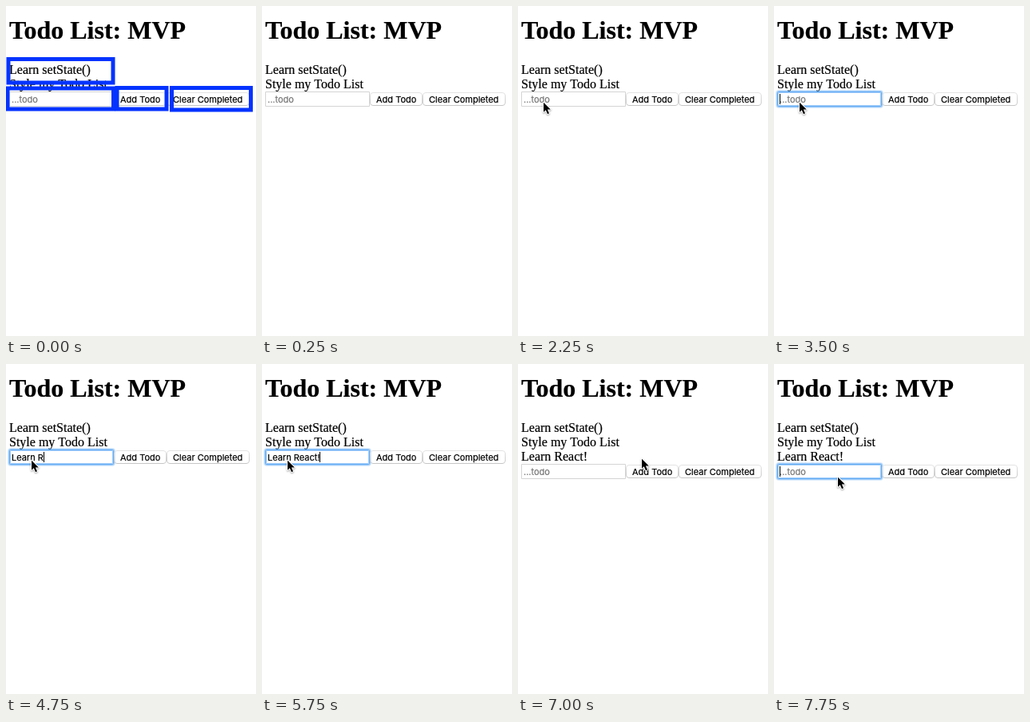
Recreate the animation shown at these times as an HTML page with a canvas. Size 313 px wide and 413 px high, loop 8000 ms.

```html
<!DOCTYPE html>
<html lang="en">
<head>
<meta charset="utf-8">
<title>Todo List</title>
<style>
  html, body { margin: 0; width: 100%; height: 100%; overflow: hidden; background: #fff; }
  canvas { display: block; width: 313px; height: 413px; }
</style>
</head>
<body>
<canvas id="stage"></canvas>
<script>
const W = 313, H = 413, LOOP = 8000, STEP = 250;
const SERIF = '"Liberation Serif", "Times New Roman", serif';
const UI = '11px Inter, Roboto, sans-serif';

const canvas = document.getElementById('stage');
const ctx = canvas.getContext('2d');
const dpr = window.devicePixelRatio || 1;
canvas.width = W * dpr;
canvas.height = H * dpr;

const entry = 'Learn React!';
const todos = ['Learn setState()', 'Style my Todo List'];
const TYPE_START = 4000, TYPE_END = 6000, PRESS = 6750, ADDED = 7000;
const FOCUS = 2500, REFOCUS = 7750;

// Places the pointer settles at; each move takes MOVE ms.
const MOVE = 500;
const stops = [
  { t: 500, x: 21, y: 147 },
  { t: 1000, x: 55, y: 118 },
  { t: 2250, x: 31, y: 120 },
  { t: 6500, x: 151, y: 118 },
  { t: 7000, x: 154, y: 118 },
  { t: 7500, x: 79, y: 141 }
];
const arrowShape = new Path2D('M1 .8V12.8L3.8 10.2 6 15.2 8 14.3 5.9 9.5H9.8Z');

const clamp = v => Math.min(1, Math.max(0, v));
const easeOut = (p, power) => 1 - (1 - clamp(p)) ** power;

function pointerAt(t) {
  const pos = { ...stops[0] };
  for (const stop of stops) {
    const p = easeOut((t - stop.t + MOVE) / MOVE, 2.2);
    pos.x += (stop.x - pos.x) * p;
    pos.y += (stop.y - pos.y) * p;
  }
  return pos;
}

function typedAt(t) {
  if (t < TYPE_START || t >= ADDED) return '';
  const p = (t - TYPE_START + STEP / 2) / (TYPE_END - TYPE_START);
  return entry.slice(0, Math.round(entry.length * easeOut(p, 1.7)));
}

const focusedAt = t => (t >= FOCUS && t < PRESS) || t >= REFOCUS;

// The caret blinks, starting over after focus and after the last key.
function caretAt(t) {
  if (!focusedAt(t)) return false;
  if (t >= TYPE_START && t < TYPE_END) return true;
  const since = t - (t >= REFOCUS ? REFOCUS : t >= TYPE_END ? TYPE_END : FOCUS);
  return Math.floor(since / 500) % 2 === 0;
}

// A hairline stroke gives the slightly heavier look of smoothed type.
function text(str, x, y, font, color = '#000') {
  ctx.font = font;
  ctx.fillStyle = ctx.strokeStyle = color;
  ctx.lineWidth = 0.2;
  ctx.fillText(str, x, y);
  ctx.strokeText(str, x, y);
}

function outline(x, y, w, h, r, color, width = 1) {
  ctx.beginPath();
  ctx.roundRect(x, y, w, h, r);
  ctx.strokeStyle = color;
  ctx.lineWidth = width;
  ctx.stroke();
}

function vertical(y, h, top, bottom) {
  const g = ctx.createLinearGradient(0, y, 0, y + h);
  g.addColorStop(0, top);
  g.addColorStop(1, bottom);
  return g;
}

function button(label, x, y, w, pressed) {
  const rim = pressed ? ['#4d98f8', '#0546d8'] : ['#e4e4e4', '#c6c6c6'];
  outline(x + 0.5, y + 0.5, w - 1, 16, 3.5, vertical(y, 17, ...rim));
  if (pressed) {
    ctx.fillStyle = vertical(y, 17, '#64abfb', '#0a66fb');
    ctx.fill();
  }
  text(label, x + 8, y + 13, UI, pressed ? '#fff' : '#000');
}

function field(y, value, focused, caretOn) {
  outline(4.5, y + 0.5, 130, 18, 0, '#d4d4d4');
  if (focused) {
    for (let g = 2; g >= -1; g--) {
      const color = `rgba(90,168,247,${0.9 - 0.33 * Math.abs(g)})`;
      outline(4.5 - g, y + 0.5 - g, 130 + 2 * g, 18 + 2 * g, g + 1, color);
    }
  }
  text(value || '...todo', 7, y + 14, UI, value ? '#000' : '#757575');
  if (caretOn) {
    ctx.fillStyle = '#000';
    const x = 7 + Math.round(value && ctx.measureText(value).width);
    ctx.fillRect(x, y + 3, 1, 13);
  }
}

function arrow({ x, y }) {
  ctx.save();
  ctx.translate(x, y);
  ctx.lineJoin = 'round';
  ctx.lineWidth = 2;
  ctx.strokeStyle = '#fff';
  ctx.shadowColor = 'rgba(0,0,0,0.35)';
  ctx.shadowBlur = 2 * dpr;
  ctx.shadowOffsetY = dpr;
  ctx.stroke(arrowShape);
  ctx.shadowColor = 'transparent';
  ctx.fillStyle = '#000';
  ctx.fill(arrowShape);
  ctx.restore();
}

function highlight(x, y, w, h) {
  ctx.strokeStyle = '#0433ff';
  ctx.lineWidth = 5;
  ctx.strokeRect(x, y, w, h);
}

function draw(t) {
  ctx.setTransform(dpr, 0, 0, dpr, 0, 0);
  ctx.fillStyle = '#fff';
  ctx.fillRect(0, 0, W, H);

  text('Todo List: MVP', 4, 41, `bold 32px ${SERIF}`);
  const items = t >= ADDED ? [...todos, entry] : todos;
  items.forEach((item, i) => text(item, 4, 85 + 18 * i, `16px ${SERIF}`));

  const y = 71 + 18 * items.length;
  field(y, typedAt(t), focusedAt(t), caretAt(t));
  button('Add Todo', 135, y + 1, 66, t >= PRESS && t < ADDED);
  button('Clear Completed', 201, y + 1, 104, false);

  if (t < STEP) {
    highlight(3, 66.5, 131, 29.5);
    highlight(2, 103, 132.5, 26);
    highlight(139, 102.5, 62, 26.5);
    highlight(207.5, 102.5, 99, 27.5);
  }
  if (t >= stops[0].t) arrow(pointerAt(t));
}

const begin = performance.now();
function tick() {
  const t = (performance.now() - begin) % LOOP;
  draw(Math.floor(t / STEP) * STEP);
  requestAnimationFrame(tick);
}
tick();
</script>
</body>
</html>
```
